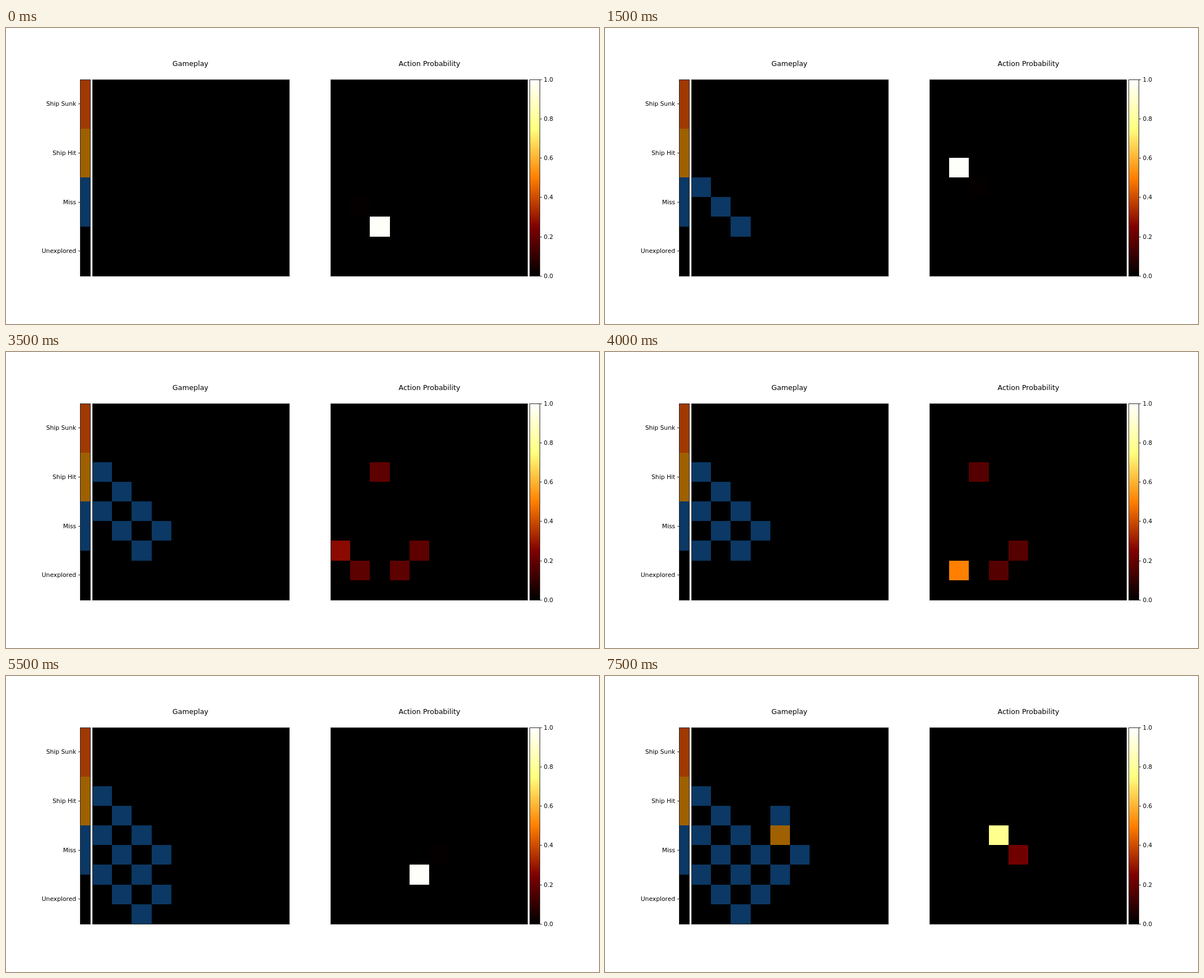
These frames come from a looping animation (1058 by 529 pixels, 8000 ms). An HTML page:

```html
<!DOCTYPE html>
<html lang="en">
<head>
<meta charset="utf-8">
<title>Gameplay and action probability</title>
<style>
html, body { margin: 0; width: 100%; height: 100%; overflow: hidden; background: #fff; }
svg { display: block; width: 100%; height: 100%; font-family: "DejaVu Sans", sans-serif; }
rect { shape-rendering: crispEdges; }
</style>
</head>
<body>
<svg id="stage" viewBox="0 0 1058 529">
  <defs>
    <linearGradient id="heat" x1="0" y1="1" x2="0" y2="0">
      <stop offset="0" stop-color="#000"/>
      <stop offset=".25" stop-color="#800000"/>
      <stop offset=".5" stop-color="#ff8000"/>
      <stop offset=".75" stop-color="#ffff80"/>
      <stop offset="1" stop-color="#fff"/>
    </linearGradient>
  </defs>
</svg>
<script>
const STEP = 500, STEPS = 16, SIZE = 10;
const SUNK = '#9f3900', HIT = '#9f6000', MISS = '#0b3864', LINE = '#292929';
const TOP = 91.75, CELL_W = 35.2, CELL_H = 35.1;
const stage = document.getElementById('stage');

// Shots walk straight from corner to corner of each path, as [row, column].
const paths = [
  [[7, 2], [5, 0], [4, 1], [6, 3]],
  [[3, 0]],
  [[7, 0], [9, 2], [6, 5], [5, 4], [4, 4], [5, 3]]
];
const shots = paths.flatMap(walk);
const isShip = ([r, c]) => r === 5 && c === 4;

// Unsure steps: confidence in the next shot, then the cells sharing the rest.
const openEnds = [[8, 3], [7, 4], [3, 2]];
const doubts = {
  7: [.27, [8, 1], ...openEnds],
  8: [.5, ...openEnds],
  9: [.58, [8, 3]],
  13: [.75, [7, 6]],
  15: [.78, [6, 4]]
};

function walk([first, ...corners]) {
  const cells = [first];
  let [r, c] = first;
  for (const [toR, toC] of corners) {
    while (r !== toR || c !== toC) {
      r += Math.sign(toR - r);
      c += Math.sign(toC - c);
      cells.push([r, c]);
    }
  }
  return cells;
}

function add(tag, attrs, text) {
  const el = document.createElementNS('http://www.w3.org/2000/svg', tag);
  for (const key in attrs) el.setAttribute(key, attrs[key]);
  if (text) el.textContent = text;
  return stage.appendChild(el);
}
const box = (x, y, width, height, fill) => add('rect', { x, y, width, height, fill });
const label = (x, y, size, anchor, text) =>
  add('text', { x, y, 'font-size': size, 'text-anchor': anchor }, text);
const frame = (x, width) => add('rect', {
  x: x + .5, y: 92.5, width: width - 1, height: 351, fill: 'none', stroke: LINE
});

const edgeX = (left, c) => Math.round(left + CELL_W * c);
const edgeY = r => Math.round(TOP + CELL_H * r);

function grid(left) {
  const cells = Array.from({ length: SIZE * SIZE }, (_, i) => {
    const r = Math.floor(i / SIZE), c = i % SIZE;
    const x = edgeX(left, c), y = edgeY(r);
    return box(x, y, edgeX(left, c + 1) - x, edgeY(r + 1) - y, '#000');
  });
  frame(left, CELL_W * SIZE);
  return ([r, c], fill) => cells[r * SIZE + c].setAttribute('fill', fill);
}

function heat(p) {
  const channel = v => Math.round(255 * Math.min(1, Math.max(0, v)));
  return `rgb(${channel(2 * p)},${channel(2 * p - .5)},${channel(2 * p - 1)})`;
}

label(329, 68, 12.6, 'middle', 'Gameplay');
label(755.5, 68, 12.6, 'middle', 'Action Probability');
const paintBoard = grid(154), paintOdds = grid(579);

const states = [['Ship Sunk', SUNK], ['Ship Hit', HIT], ['Miss', MISS], ['Unexplored', '#000']];
const band = SIZE / states.length;
states.forEach(([name, fill], i) => {
  const y = edgeY(band * i), mid = Math.floor(TOP + CELL_H * band * (i + .5));
  box(132, y, 19, edgeY(band * (i + 1)) - y, fill);
  box(129, mid, 3, 1, LINE);
  label(125.2, mid + 4, 10.75, 'end', name);
});
frame(132, 19);

box(934, 92, 19, 351, 'url(#heat)');
frame(934, 19);
for (let i = 0; i <= SIZE; i += 2) {
  const y = edgeY(i);
  box(953, y, 3, 1, LINE);
  label(959.5, y + 4, 10.5, 'start', (1 - i / SIZE).toFixed(1));
}

let shown = -1;
function draw(step) {
  if (step === shown) return;
  shown = step;
  for (let r = 0; r < SIZE; r++) {
    for (let c = 0; c < SIZE; c++) {
      paintBoard([r, c], '#000');
      paintOdds([r, c], '#000');
    }
  }
  for (const cell of shots.slice(0, step)) paintBoard(cell, isShip(cell) ? HIT : MISS);
  const [sure, ...rivals] = doubts[step] || [.99, shots[step + 1]];
  paintOdds(shots[step], heat(sure));
  for (const cell of rivals) paintOdds(cell, heat((1 - sure) / rivals.length));
}

const start = performance.now();
function tick() {
  draw(Math.floor((performance.now() - start) / STEP) % STEPS);
  requestAnimationFrame(tick);
}
tick();
</script>
</body>
</html>
```
